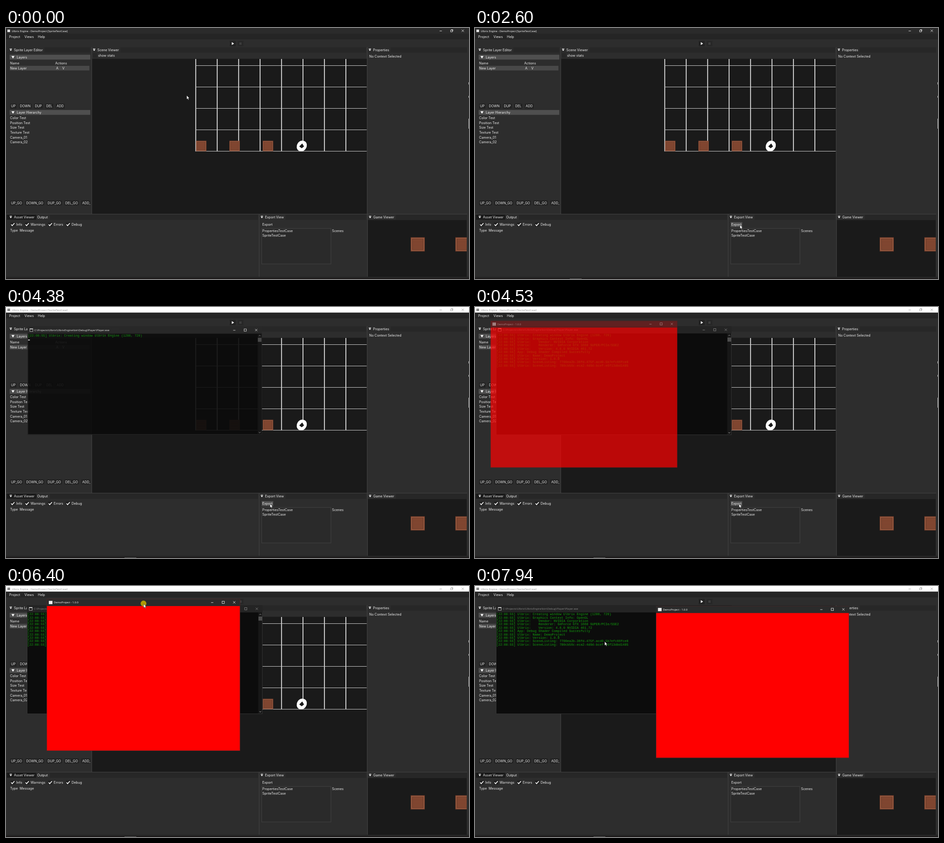
Recreate the animation shown at these times as an HTML page with a canvas. Size 1016 px wide and 551 px high, loop 8000 ms.

```html
<!DOCTYPE html>
<html lang="en">
<head>
<meta charset="utf-8">
<title>Editor export</title>
<style>
html, body { margin: 0; width: 100%; height: 100%; overflow: hidden; background: #2d2d2d; }
canvas { display: block; }
</style>
</head>
<body>
<canvas id="stage" width="1016" height="551"></canvas>
<script>
const g = document.getElementById('stage').getContext('2d');
const LOOP = 8000, STEP = 77;
const UI = '7.25px Inter, sans-serif';
const TITLE = '5.9px "Open Sans", sans-serif';
const MONO = '7px "Liberation Mono", monospace';
const PANEL = '#2d2d2d', DARK = '#1a1a1a', BUTTON = '#222', HOVER = '#4f4f4f', STRIP = '#272727';

// Pointer strokes; the screen only updates while one runs
const strokes = [
  { from: 350, to: 1120, x: 565, y: 265 },
  { from: 1210, to: 1970, x: 583, y: 440 },
  { from: 2600, to: 3060, x: 590, y: 451, bendX: -5, bendY: -19 },
  { from: 3210, to: 3520, x: 579.5, y: 432 },
  { from: 3990, to: 4680, x: 579.5, y: 432 },
  { from: 5080, to: 5780, x: 239.5, y: 35.5, bendY: -180 },
  { from: 5920, to: 6630, x: 529, y: 53.3, power: 4.3 },
  { from: 6930, to: 7330, x: 609.5, y: 54.8, bendY: 6, power: 2.5 },
  { from: 7640, to: 7940, x: 284.5, y: 122 }
];
const START = [396.5, 148];
const CLICK = 3990, GRAB = 5780, DROP = 7330, RELEASE = 7640;
const GRIP = [212.5, 10.5];

const log = [
  'Ulbrix: Creating window Ulbrix Engine (1280, 720)',
  'Ulbrix: Graphics Context Info: OpenGL',
  'Ulbrix:    Vendor: NVIDIA Corporation',
  'Ulbrix:    Renderer: GeForce GTX 1660 SUPER/PCIe/SSE2',
  'Ulbrix:    Version: 4.6.0 NVIDIA 461.72',
  'App: Debug Shader Compiled Succesfully',
  'Ulbrix: Name: DemoProject',
  'Ulbrix: Version: 1.0.0',
  'Ulbrix: SceneListing: 7700ea2b-36fd-475f-acd0-5b7efc66fce8',
  'Ulbrix: SceneListing: 780cb56c-eca2-4d9d-bcef-e6f13dbd1485'
];

const clamp = (v, a, b) => Math.min(b, Math.max(a, v));
const ramp = (t, a, b) => clamp((t - a) / (b - a), 0, 1);

// Pointer place and the time of the latest screen update
function pose(t) {
  let [x, y] = START, time = 0;
  for (const { from, to, x: endX, y: endY, bendX = 0, bendY = 0, power = 1 } of strokes) {
    if (t < from) break;
    const n = Math.round((to - from) / STEP);
    const i = Math.min(n, Math.floor((t - from) / (to - from) * n + 1e-6));
    const k = ((i + 1) / (n + 1)) ** power, arc = 4 * k * (1 - k);
    x += (endX - x) * k + bendX * arc;
    y += (endY - y) * k + bendY * arc;
    time = from + i / n * (to - from);
  }
  return { x, y, time };
}

function box(x, y, x2, y2, fill, edge) {
  g.fillStyle = fill;
  g.fillRect(x, y, x2 - x, y2 - y);
  if (edge) {
    g.strokeStyle = edge;
    g.lineWidth = 1;
    g.strokeRect(x + .5, y + .5, x2 - x - 1, y2 - y - 1);
  }
}

// y is the middle of the capitals; returns the right end
function text(s, x, y, color = '#eee', font = UI) {
  g.font = font;
  g.fillStyle = color;
  g.fillText(s, x, y + parseFloat(font) * .36);
  return x + g.measureText(s).width;
}

function trace(pts) {
  g.beginPath();
  for (let i = 0; i < pts.length; i += 2) g.lineTo(pts[i], pts[i + 1]);
}

function poly(pts, fill) {
  trace(pts);
  g.closePath();
  g.fillStyle = fill;
  g.fill();
}

function line(pts, color, width) {
  trace(pts);
  g.strokeStyle = color;
  g.lineWidth = width;
  g.stroke();
}

function oval(x, y, rx, ry, turn, fill) {
  g.beginPath();
  g.ellipse(x, y, rx, ry, turn, 0, 7);
  g.fillStyle = fill;
  g.fill();
}

function clipped(x, y, w, h, paint) {
  g.save();
  g.beginPath();
  g.rect(x, y, w, h);
  g.clip();
  paint();
  g.restore();
}

function tab(s, x, y, fill = PANEL) {
  g.font = UI;
  box(x - 6, y - 5.5, x + 13 + g.measureText(s).width, y + 5.5, fill);
  box(x, y - 3, x + 5, y - 2, '#fff');
  poly([x, y - 1, x + 5, y - 1, x + 2.5, y + 2.5], '#fff');
  return text(s, x + 9.5, y);
}

function buttons(labels, y) {
  let x = 11;
  g.font = UI;
  for (const s of labels) {
    box(x - 2, y - 5.3, x + g.measureText(s).width + 2, y + 5.3, BUTTON);
    x = text(s, x, y) + 9.5;
  }
}

function rows(labels, x, y) {
  labels.forEach((s, i) => text(s, x, y + i * 10.6));
}

function header(s, y) {
  box(8, y - 5.3, 185, y + 5.3, HOVER);
  poly([12, y - 2.5, 18.6, y - 2.5, 15.3, y + 3], '#fff');
  text(s, 23.5, y);
}

function crate(x, y, w) {
  const u = w / 24;
  const inset = (d, fill) => box(x + d * u, y + d * u, x + w - d * u, y + w - d * u, fill);
  inset(0, '#6e3b29');
  inset(.8, '#95573e');
  inset(2.6, '#5f3424');
  inset(3.3, '#874a33');
  for (let i = 1; i < 8; i++) {
    const yy = y + (3.3 + i * 2.18) * u;
    box(x + 3.3 * u, yy, x + w - 3.3 * u, yy + .6 * u, '#6d3a29');
  }
}

// Minimise, maximise or restore, close
function controls(x, y, color, restore) {
  const mid = x + 24.2, end = x + 48.4;
  line([x - 2.5, y + .5, x + 2.5, y + .5], color, .8);
  if (restore) {
    g.strokeRect(mid - 2.5, y - 1.3, 3.8, 3.8);
    line([mid - 1.2, y - 2.5, mid + 2.5, y - 2.5, mid + 2.5, y + 1.3], color, .8);
  } else {
    g.strokeRect(mid - 2.5, y - 2.5, 5, 5);
  }
  line([end - 2.5, y - 2.5, end + 2.5, y + 2.5], color, .8);
  line([end - 2.5, y + 2.5, end + 2.5, y - 2.5], color, .8);
}

function leftPanel() {
  tab('Sprite Layer Editor', 8, 48);
  header('Layers', 64);
  text('Name', 9, 77.2);
  text('Actions', 108, 77.2);
  box(8.5, 83, 183, 93.2, '#484848');
  text('New Layer', 9, 88);
  text('A', 110, 88);
  text('V', 123.5, 88);
  buttons(['UP', 'DOWN', 'DUP', 'DEL', 'ADD'], 171.5);
  header('Layer Hierarchy', 185.3);
  rows(['Color Test', 'Position Test', 'Size Test', 'Texture Test', 'Camera_01', 'Camera_02'], 9, 197.5);
  clipped(0, 370, 185, 30, () => buttons(['UP_GO', 'DOWN_GO', 'DUP_GO', 'DEL_GO', 'ADD_GO'], 384));
}

function sceneView() {
  tab('Scene Viewer', 191, 48);
  box(190.5, 55, 200, 65, STRIP);
  text('show stats', 202, 60);
  box(189, 67.5, 792, 408, DARK);
  for (let i = 0; i < 8; i++) box(415.6 + i * 47.05, 68, 417.2 + i * 47.05, 271, '#fff');
  for (let i = 0; i < 5; i++) box(416, 82 + i * 47, 791.5, 83 + i * 47, '#ccc');
  for (let i = 0; i < 3; i++) crate(416.8 + i * 73.3, 247.5, 23);
  oval(649, 259, 10.6, 12.3, .6, '#fff');
  poly([643.5, 260, 650, 253.5, 654, 260, 649, 264], DARK);
}

function outputPanel() {
  const x = tab('Asset Viewer', 8, 415.3, DARK) + 6;
  box(x - 2, 410, x + 28, 421, PANEL);
  text('Output', x, 415.3);
  let at = 10;
  for (const s of ['Info', 'Warnings', 'Errors', 'Debug']) {
    box(at, 426.5, at + 9.5, 436, BUTTON);
    line([at + 1.3, 431.3, at + 3.6, 434, at + 8.5, 428.5], '#fff', 1.7);
    at = text(s, at + 12.5, 431.3) + 6;
  }
  text('Type', 9, 444.7);
  text('Message', 30, 444.7);
}

function exportPanel({ x, y, time }) {
  tab('Export View', 559, 415.3);
  if (y > 425 && y < 437.5 && x < 586) box(561, 426, 586.5, 437, HOVER);
  text('Export', 562.5, 431.3);
  box(560.5, 439.5, 713.5, 518.5, '#2a2a2a', '#444');
  const row = Math.floor((y - 439.7) / 10.6);
  if (row === 0 || row === 1) box(561.5, 439.8 + row * 10.6, 712.5, 450.2 + row * 10.6, HOVER);
  rows(['PropertiesTestCase', 'SpriteTestCase'], 562.5, 445.2);
  text('Scenes', 715.5, 445.2);
}

function gameView() {
  tab('Game Viewer', 796.5, 415.3);
  box(794, 421.5, 1011, 546, DARK);
  clipped(794, 421, 217, 125, () => {
    crate(888, 459.5, 31);
    crate(986, 459.5, 31);
  });
}

function editor(p) {
  const idle = p.time >= 4290, ink = idle ? '#999' : '#fff';
  box(0, 0, 1016, 551, PANEL);
  box(0, 0, 1016, 12.5, idle ? '#fff' : '#2b2b2b');
  box(3, 3.5, 9, 9, idle ? '#8a8a8a' : '#ddd');
  text('Ulbrix Engine - DemoProject [SpriteTestCase]', 12.5, 6.5, ink, TITLE);
  controls(954, 6, ink, true);
  box(0, 12.5, 1016, 25, '#252525');
  text('Project', 7, 19);
  text('Views', 40.5, 19);
  text('Help', 70, 19);
  box(491, 28.5, 504, 40, BUTTON);
  poly([495.5, 31, 495.5, 37.3, 500.5, 34.2], '#fff');
  box(508.5, 28.5, 521, 40, STRIP);
  box(512, 31.7, 517, 36.7, '#3c3c3c');
  for (const y of [42.5, 409.5]) box(2, y, 1012, y + 11.5, STRIP);

  leftPanel();
  sceneView();
  tab('Properties', 796, 48);
  text('No Context Selected', 797, 62.8);
  outputPanel();
  exportPanel(p);
  gameView();

  const rim = '#434343';
  for (const x of [187.5, 792]) box(x, 42, x + 1, 408, rim);
  for (const x of [555, 792.7]) box(x, 409, x + 1, 546, rim);
  box(0, 408, 1012, 409, rim);
  box(0, 546, 1016, 549.5, '#252525');
  box(0, 549.5, 1016, 551, '#161212');
  // Slivers of the desktop at the edges
  for (const [y, h] of [[119, 5], [149, 4], [199, 22]]) box(1015, y, 1016, y + h, '#ccc');
  const task = idle ? 260 : 208;
  if (p.time > 400) box(task, 550, task + 26, 551, '#666');
}

// Draws a window faded and scaled about its centre
function opening(k, x, y, w, h, paint) {
  if (k <= 0) return;
  const s = .94 + .06 * k;
  g.save();
  g.globalAlpha = k;
  g.translate(x + w / 2, y + h / 2);
  g.scale(s, s);
  g.translate(-w / 2, -h / 2);
  paint();
  g.restore();
}

function consoleWindow(t) {
  const k = 1 - (1 - ramp(t, 4220, 4450)) ** 2.2;
  const idle = t > 4500, ink = idle ? '#8a8a8a' : '#fff';
  opening(k, 46, 42, 517, 239, () => {
    box(0, 0, 517, 239, '#0c0c0c', '#333');
    box(0, 0, 517, 16, idle ? '#242424' : '#2b2b2b');
    box(4.5, 4.5, 12, 11.5, '#ddd');
    box(5.3, 6.5, 11.2, 10.7, '#111');
    text('C:\\Projects\\Ulbrix\\UlbrixEngine\\bin\\Debug\\Player\\Player.exe', 15, 8, ink, TITLE);
    controls(456, 8, ink);
    box(507.5, 16, 516, 238, '#171717');
    box(508, 25, 516, 34, '#4d4d4d');
    line([510, 21.5, 512, 19.5, 514, 21.5], '#aaa', .9);
    line([510, 233, 512, 235, 514, 233], '#aaa', .9);
    const n = t < 4440 ? 1 : log.length;
    for (let i = 0; i < n; i++) text('[22:08:55] ' + log[i], .8, 19.8 + i * 7.38, '#13a10e', MONO);
    if (n === 1) box(1, 29, 5, 31, '#eee');
  });
}

function playerWindow(t) {
  const grip = pose(clamp(t, GRAB, DROP));
  const k = 1 - (1 - ramp(t, 4450, 4680)) ** 1.5;
  opening(k, grip.x - GRIP[0], grip.y - GRIP[1], 424, 333, () => {
    box(0, 0, 424, 333, '#f00', '#4a2a2a');
    box(0, 0, 424, 15.3, '#2b2b2b');
    box(4.5, 3.8, 12.5, 11, '#eee');
    text('DemoProject - 1.0.0', 15.5, 7.3, '#fff', TITLE);
    controls(363, 7, '#fff');
    box(.8, 15.3, 423.2, 332.2, '#f00');
  });
}

function pointer({ x, y, time: t }) {
  const pressed = (t >= CLICK && t < CLICK + 150) || (t >= GRAB && t < RELEASE);
  if (pressed) oval(x - .2, y - 1, 6.3, 6.3, 0, 'rgba(190,165,0,.9)');
  g.save();
  g.translate(x, y);
  poly([0, 0, 0, 8.6, 2, 6.8, 3.4, 10, 4.8, 9.4, 3.4, 6.3, 6, 6.2], '#fff');
  g.strokeStyle = '#000';
  g.lineWidth = .5;
  g.stroke();
  g.restore();
}

function frame(now) {
  const p = pose(now % LOOP);
  editor(p);
  consoleWindow(p.time);
  playerWindow(p.time);
  pointer(p);
  requestAnimationFrame(frame);
}
requestAnimationFrame(frame);
</script>
</body>
</html>
```
